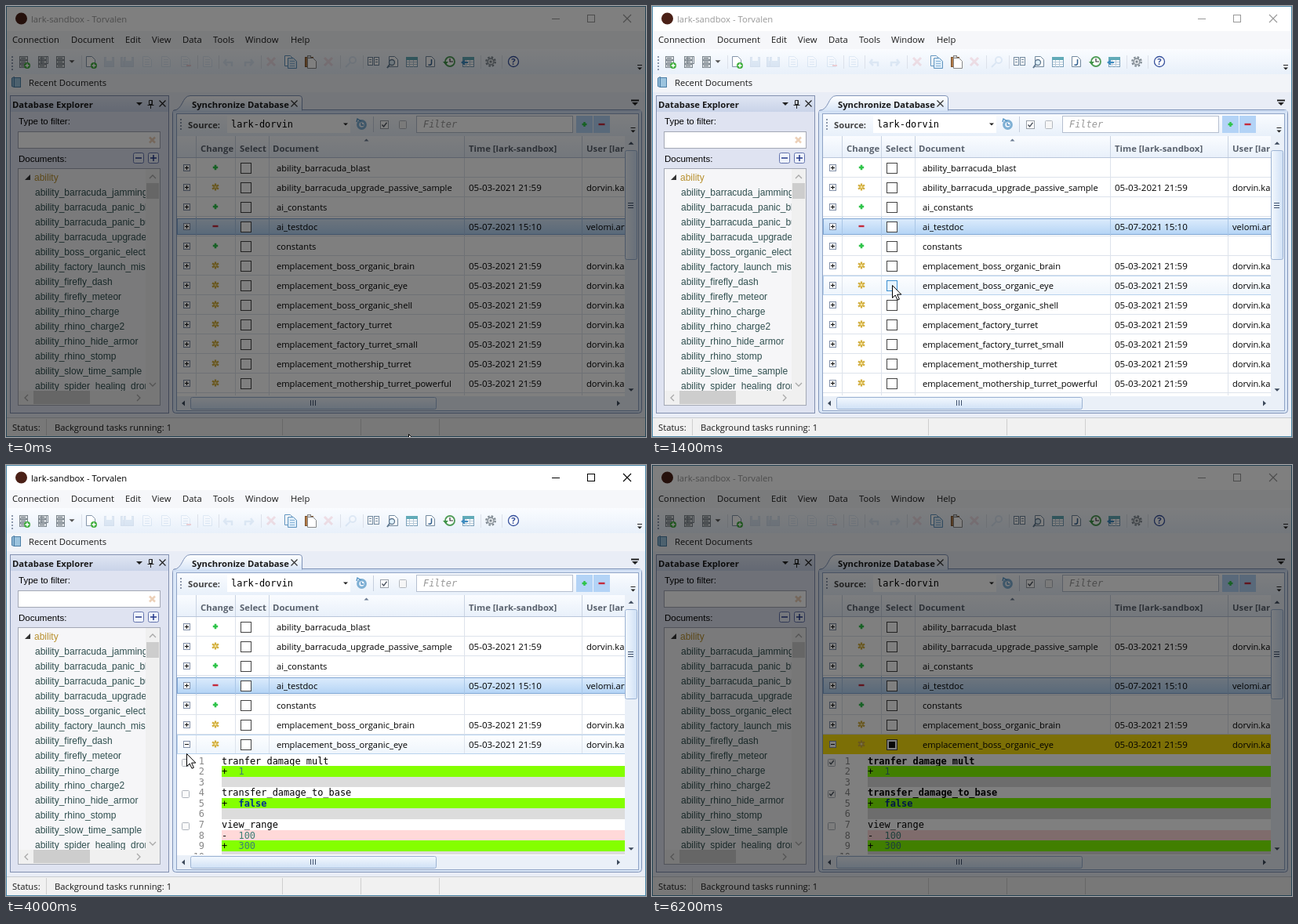
An HTML page that plays this animation: 816 by 550 pixels, repeating every 6400 ms.

```html
<!DOCTYPE html>
<html lang="en">
<head>
<meta charset="utf-8">
<title>Synchronize Database</title>
<style>
html, body { margin: 0; width: 100%; height: 100%; overflow: hidden; background: #fff; }
svg { display: block; }
text { font: 11.25px "Open Sans", "Noto Sans", sans-serif; fill: #1a1a1a; white-space: pre; }
.row { font-size: 11.15px; fill: #000; }
.num { font-size: 11.55px; fill: #000; }
.bold { font-weight: 700; }
.head { font-weight: 700; font-size: 11.35px; fill: #5a626e; }
.tree { font: 12px "Liberation Sans", Arial, sans-serif; fill: #2f4f4f; }
.label { font: 11.5px "Liberation Sans", Arial, sans-serif; fill: #000; }
.mono { font: 11.95px "DejaVu Sans Mono", monospace; fill: #000; }
</style>
</head>
<body>
<svg width="816" height="550" viewBox="0 0 816 550">
  <defs>
    <linearGradient id="bar" x2="0" y2="1"><stop stop-color="#fafcff"/><stop offset="1" stop-color="#e8f0fa"/></linearGradient>
    <linearGradient id="caption" x2="0" y2="1"><stop stop-color="#dfe5f3"/><stop offset="1" stop-color="#c9d3e8"/></linearGradient>
    <linearGradient id="tab" x2="0" y2="1"><stop stop-color="#fff"/><stop offset="1" stop-color="#d9e6f7"/></linearGradient>
    <linearGradient id="pick" x2="0" y2="1"><stop stop-color="#dcebfc"/><stop offset="1" stop-color="#b4d4f5"/></linearGradient>
    <linearGradient id="over" x2="0" y2="1"><stop stop-color="#fdfeff"/><stop offset="1" stop-color="#eef5fc"/></linearGradient>
    <linearGradient id="thumb" x2="0" y2="1"><stop stop-color="#f3f8fe"/><stop offset="1" stop-color="#cfe0f5"/></linearGradient>
    <linearGradient id="thumbV"><stop stop-color="#f3f8fe"/><stop offset="1" stop-color="#cfe0f5"/></linearGradient>
    <clipPath id="treeClip"><rect x="16" y="208" width="162" height="283"/></clipPath>
    <clipPath id="gridClip"><rect x="218" y="166" width="571" height="331"/></clipPath>
  </defs>
  <g id="base"></g>
  <g id="live"></g>
</svg>
<script>
const LOOP = 6400, STEP = 200;
const SPACE = 'lark-sandbox', USER = 'dorvin.ka', OTHER = 'velomi.arten';

const rect = (x, y, w, h, fill, stroke, more = '') => stroke
  ? `<rect x="${x + .5}" y="${y + .5}" width="${w - 1}" height="${h - 1}" fill="${fill}" stroke="${stroke}" ${more}/>`
  : `<rect x="${x}" y="${y}" width="${w}" height="${h}" fill="${fill}" ${more}/>`;
const path = (d, stroke, width = 1, fill = 'none') =>
  `<path d="${d}" fill="${fill}" stroke="${stroke}" stroke-width="${width}"/>`;
const shape = (d, fill) => `<path d="${d}" fill="${fill}"/>`;
// y is the middle of the line
const text = (x, y, s, cls = '', more = '') => `<text x="${x}" y="${y + 4}" class="${cls}" ${more}>${s}</text>`;
const cross = (x, y, r, color, width = 1) =>
  path(`M${x - r} ${y - r}l${2 * r} ${2 * r}m0 ${-2 * r}l${-2 * r} ${2 * r}`, color, width);
const plus = (x, y, r, color, width) => path(`M${x - r} ${y}h${2 * r}M${x} ${y - r}v${2 * r}`, color, width);
const minus = (x, y, r, color, width) => path(`M${x - r} ${y}h${2 * r}`, color, width);
const caret = (x, y, r = 4, color = '#222') => shape(`M${x - r} ${y - r / 2}h${2 * r}l${-r} ${r}z`, color);
const caretUp = (x, y, r, color) => shape(`M${x - r} ${y + r / 2}h${2 * r}l${-r} ${-r}z`, color);
const tick = (x, y, r, color, width) => path(`M${x - r} ${y}l${r * .7} ${r * .8}l${r * 1.3} ${-r * 1.7}`, color, width);
const circle = (x, y, r, fill, stroke = 'none', width = 1) =>
  `<circle cx="${x}" cy="${y}" r="${r}" fill="${fill}" stroke="${stroke}" stroke-width="${width}"/>`;
const overflow = (x, y) => path(`M${x - 3} ${y - 3.5}h6`, '#222') + caret(x, y + 1, 3);

// ---- toolbar icons, drawn around their middle ----
const page = (x, y, line = '#8495aa', fill = '#fff') => path(`M${x - 5.5} ${y - 6.5}h7l4 4v9h-11z`, line, 1, fill);
const lines = (x, y, color) => path(`M${x - 3} ${y - 2.5}h6m-6 3h6m-6 3h6`, color);
const server = (x, y) => [-7, -2, 3].map(dy => rect(x - 6, y + dy, 11, 5, '#dfe3e6', '#7c868e')
  + minus(x - 1, y + dy + 2.5, 3, '#59646d', 1)).join('');
const table = (x, y) => rect(x - 7, y - 7, 15, 13, '#fff', '#7ba0ba') + rect(x - 7, y - 7, 15, 4, '#62abb8')
  + path(`M${x - 6} ${y - .5}h13m-13 3h13M${x - 2.5} ${y - 3}v9m5 -9v9`, '#b5c9d9');
const badge = (x, y) => circle(x, y, 4, '#3fae3c') + plus(x, y, 2.5, '#fff', 1.5);
const faded = s => `<g opacity=".18">${s}</g>`;

function toolbar() {
  const y = 71, blue = '#7fa6cf', gray = '#71889e';
  let s = '';
  for (let i = 0; i < 5; i++) s += rect(7, 64 + i * 4, 2, 2, '#8d99ad');
  s += server(23, y) + badge(27, 76) + server(47, y) + rect(45, 64, 9, 10, 'none', '#7c868e') + server(70, y) + caret(84, 71, 3.5, '#555');
  s += page(108, y) + badge(112, 76);
  const save = x => rect(x - 7, y - 6, 13, 13, blue, '#6485b0') + rect(x - 4, y - 6, 7, 5, '#fff');
  const sheet = x => page(x, y, blue) + lines(x, y, blue);
  s += faded(save(132) + save(153) + save(157) + sheet(180) + sheet(204) + sheet(229) + minus(233, 76, 3, '#d22', 2)
    + sheet(257) + path('M281 68l-3 4l4 4M279 72h9v5', blue, 2.5) + path('M312 68l3 4l-4 4M314 72h-9v5', blue, 2.5)
    + cross(338, y, 5, '#d96b78', 3) + cross(411, y, 5, '#d96b78', 3) + circle(442, 69, 4, '#fff', blue, 2) + path('M439 72l-6 6', blue, 2));
  s += page(361, 70, '#5f93bf') + page(365, 73, '#5f93bf', '#dcecf8') + lines(365, 73, '#8bb5d9');
  s += rect(381, 65, 11, 13, '#b07a48', '#7d5530') + rect(384, 63, 5, 4, '#d9d9d9', '#888') + page(390, 73, '#888');
  s += rect(461, 65, 7, 11, '#fff', gray) + rect(469, 65, 7, 11, '#fff', gray) + path('M463 68.500h3m-3 3h3m5 -3h3m-3 3h3', gray);
  s += page(494, y, gray) + circle(492, 72, 3.5, '#dff0fa', '#5f7890', 1.3) + path('M489 75l-3 4', '#5f7890', 2);
  s += table(517, 72) + page(541, y, gray) + path('M542.500 68v5q0 3 -4 2', '#315f8e', 1.5);
  s += circle(566, y, 6, '#fff', '#4f9c57', 1.8) + path('M566 67v4h4', '#333', 1.2) + shape('M557 71h7l-3.500 4z', '#3d9146');
  s += table(589, 72) + shape('M580 72l5 -4v3h4v2h-4v3z', '#3e8cc0');
  s += circle(618, y, 5.8, 'none', '#7c868e', 2).replace('/>', ' stroke-dasharray="2.5 2.05"/>')
    + circle(618, y, 4, '#dfe3e7', '#7c868e', 1.3) + circle(618, y, 1.5, '#7c868e');
  s += circle(647, y, 6.5, '#fff', '#344f9c', 1.3) + text(644.3, 71, '?', 'bold', 'style="fill:#344f9c"');
  for (const x of [96, 244, 271, 325, 426, 455, 605, 632]) s += rect(x, 63, 1, 17, '#dce1ea');
  return s + overflow(808, 79);
}

function explorer() {
  const items = ['barracuda_jamming_field', 'barracuda_panic_blast', 'barracuda_panic_burst', 'barracuda_upgrade_passive',
    'boss_organic_electric', 'factory_launch_missile', 'firefly_dash', 'firefly_meteor', 'rhino_charge', 'rhino_charge2',
    'rhino_hide_armor', 'rhino_stomp', 'slow_time_sample', 'spider_healing_drone'];
  let s = rect(5, 114, 203, 406, '#dfe3f1', '#8290b0') + rect(6, 115, 201, 20, 'url(#caption)');
  s += text(8, 126, 'Database Explorer', 'bold') + caret(170, 125, 4)
    + path('M182.500 120.500h4v5h-4zM186 120v6M180.500 126.500h8M184.500 126v5', '#222') + cross(199.5, 124.5, 4, '#222', 1.2);
  s += text(16, 147, 'Type to filter:', 'label') + rect(15, 160, 182, 22, '#fff', '#a3a8b5') + cross(186.5, 171, 3.5, '#ecd0b8', 2.5);
  s += text(16, 195, 'Documents:', 'label');
  for (const x of [162, 181]) s += rect(x, 187, 14, 14, '#eef2fb', '#6474ae', 'rx="2"');
  s += minus(169, 194, 4, '#24388a', 1.5) + plus(188, 194, 4, '#24388a', 1.5);
  s += rect(15, 207, 182, 303, '#f6f6f8', '#a3a8b5') + '<g clip-path="url(#treeClip)">';
  s += shape('M31 215v7h-7z', '#333') + text(36, 219, 'ability', 'tree', 'style="fill:#b8902e"');
  items.forEach((name, i) => s += text(37, 238 + 19 * i, 'ability_' + name, 'tree'));
  s += '</g>' + rect(178, 208, 18, 301, '#f0f0f0') + rect(16, 491, 162, 18, '#f0f0f0')
    + rect(179, 226, 16, 20, '#cdcdcd') + rect(35, 491, 72, 17, '#cdcdcd');
  return s + path('M183 220l4 -4l4 4M183 481l4 4l4 -4M28 496l-4 4l4 4M167 496l4 4l-4 4', '#a8a8a8', 1.3);
}

function syncPanel() {
  let s = rect(212, 132, 599, 388, '#dbe7f7', '#7f93b8', 'rx="4"') + rect(213, 133, 597, 3, '#cfdef3');
  s += path('M213 133.500C226 133 224 114.500 235 114.500H374Q377.500 114.500 377.500 118V133.500', '#7f93b8', 1, 'url(#tab)');
  s += text(237, 126, 'Synchronize Database', 'bold') + cross(367.5, 124.5, 4, '#333', 1.2)
    + path('M797 120.500h10', '#222', 2) + caret(802, 125, 4);
  s += rect(217, 137, 590, 380, '#fff', '#8ea3c6') + rect(218, 138, 588, 28, 'url(#bar)');
  for (let i = 0; i < 4; i++) s += rect(222, 144 + i * 4, 2, 2, '#8d99ad');
  s += text(232, 152, 'Source:', 'bold', 'style="fill:#444"') + rect(282, 140, 157, 22, '#fff')
    + text(287, 151, 'lark-dorvin', 'mono') + caret(433, 151, 3);
  s += circle(453.5, 151.5, 4.8, 'none', '#7fb0d4', 3.2) + path('M447 148l1 -4l5 3M453 149v3h3', '#4f90c2', 1.3) + rect(468, 141, 1, 20, '#c5cedd');
  s += rect(477, 146, 11, 11, '#fff', '#9aa0a8') + tick(482.5, 151.5, 3, '#4d5560', 1.4)
    + rect(501, 146, 10, 11, '#f6f6f6', '#b3b8bf', 'rx="1"');
  s += rect(523, 140, 200, 22, '#fff', '#b5bfd0') + text(532, 151, 'Filter', 'mono', 'style="fill:#999;font-style:italic"');
  s += rect(727, 140, 21, 22, '#b3d3f6') + rect(749, 140, 21, 22, '#b3d3f6') + plus(737.5, 151, 3, '#2fc44a', 2.4)
    + minus(759.5, 151, 4, '#c42b3c', 2.4) + overflow(799.5, 159);
  // bottom scroll bar
  s += rect(218, 498, 588, 18, '#eaf0f8') + rect(235, 499, 314, 16, 'url(#thumb)', '#9cb3d3', 'rx="2"')
    + path('M388.500 503v7m3 -7v7m3 -7v7', '#3d4f6b') + shape('M228 503.500v7l-4 -3.500zM779 503.500v7l4 -3.500z', '#3d4a5c');
  return s;
}

function drawBase() {
  const menu = [[8, 'Connection'], [83, 'Document'], [152, 'Edit'], [186, 'View'], [225, 'Data'], [264, 'Tools'], [305, 'Window'], [363, 'Help']];
  let s = rect(0, 0, 816, 550, '#e9edf6') + rect(0, 0, 816, 32, '#fff') + rect(0, 32, 816, 23, '#f6f7fa')
    + rect(0, 55, 816, 32, 'url(#bar)') + rect(0, 87, 816, 23, '#f2f4f8');
  s += circle(19.5, 16, 7.5, '#4b2117');
  for (const [x, name] of menu) s += text(x, 43, name);
  s += toolbar() + path('M7.500 92l3 -1.500v13l-3 -1z', '#4b7ea6', 1, '#8fb9d6') + rect(10, 91, 9, 13, '#9cc4de', '#4b7ea6') + text(29, 98, 'Recent Documents');
  s += explorer() + syncPanel();
  s += rect(0, 525, 816, 25, '#f1f1f1') + rect(0, 525, 816, 1, '#c9ccd2');
  for (const x of [51, 352, 452, 552]) s += rect(x, 527, 1, 21, '#cfcfcf');
  s += text(8, 538, 'Status:') + text(62, 538, 'Background tasks running: 1');
  return s + rect(0, 0, 816, 550, 'none', '#4b87a8');
}

// ---- grid ----
const ROWS = ['+ability_barracuda_blast', '*ability_barracuda_upgrade_passive_sample', '+ai_constants', '-ai_testdoc', '+constants',
  ...['boss_organic_brain', 'boss_organic_eye', 'boss_organic_shell', 'factory_turret', 'factory_turret_small',
    'mothership_turret', 'mothership_turret_powerful', 'organic_tower'].map(s => '*emplacement_' + s)];
const EYE = 6, COLS = [242, 292, 335, 584, 734];

const mark = {
  '+': y => plus(267, y, 3.2, '#2fc44a', 2.6),
  '-': y => minus(267, y, 3.5, '#c42b3c', 2.4),
  '*': y => path(`M267 ${y - 4.5}v9M263 ${y - 2.5}l8 5m0 -5l-8 5`, '#d2ae3e', 2.3) + circle(267, y, 1.5, '#f7e49c'),
};

function checkBox(y, kind, hot) {
  let s = rect(299, y - 6.5, 14, 14, hot ? '#e6f3fd' : '#fff', hot ? '#3c8fd0' : '#444');
  if (kind === 'on') s += tick(306, y, 4.5, '#111', 2.4);
  if (kind === 'part') s += rect(302, y - 3.5, 8, 8, '#111');
  return s;
}

function row(i, st) {
  const y = 206.5 + 25 * i, top = y - 12.5, hot = st.hover === i, eye = i === EYE;
  const kind = eye ? st.check : '', filled = kind && !hot, open = eye && st.open;
  const name = ROWS[i], type = name[0];
  let s = rect(218, top, 571, 25, filled ? '#fadf0c' : hot && !kind ? 'url(#over)' : '#fff');
  if (type === '-') s += rect(218, top + 2, 573, 21, 'url(#pick)', '#7ea5d3');
  if (!filled) {
    for (const x of COLS) s += rect(x, top, 1, 25, type === '-' ? '#a9c6e6' : '#dde3ec');
    s += rect(218, top + 24, 571, 1, '#dde3ec');
  }
  if (hot && !kind) s += rect(218, top, 573, 25, 'none', '#b9d3ee');
  if (hot && kind) s += rect(219, top + 1, 572, 23, 'none', '#d9cf45', 'stroke-width="2"');
  s += rect(226, y - 4.5, 9, 9, '#fff', '#8290a8') + (open ? minus : plus)(230.5, y, 2.5, '#111', 1);
  s += mark[type](y - .5) + checkBox(y, kind, hot && st.x > 294 && st.x < 335) + text(345, y + .5, name.slice(1), 'row');
  if (type !== '+') s += text(590, y + .5, type === '-' ? '05-07-2021 15:10' : '05-03-2021 21:59', 'num')
    + text(740, y + .5, type === '-' ? OTHER : USER, 'row');
  return s;
}

function details(st) {
  const tint = { '+': '#84ff00', '-': '#ffd9d9', ' ': '#dcdcdc' };
  const body = ['tranfer_damage_mult', '+  1', ' ', 'transfer_damage_to_base', '+  false', ' ', 'view_range', '-  100', '+  300', ' '];
  const lineY = i => Math.round(377.7 + 13.55 * i);
  let s = rect(218, 369, 571, 130, '#fff');
  body.forEach((line, i) => {
    const y = lineY(i), color = tint[line[0]];
    s += text(253, y, i + 1, 'mono', 'text-anchor="end" style="fill:#888"');
    if (color) {
      const word = line.slice(3), isWord = word === 'false';
      s += rect(275, y - 7, 514, lineY(i + 1) - y, color) + text(275, y, line[0], 'mono')
        + text(296.5, y, word, 'mono', `style="fill:${isWord ? '#00308f;font-weight:700' : '#3c7f78'}"`);
      return;
    }
    const on = i / 3 < st.picked;
    s += text(275, y, line, 'mono', on ? 'style="font-weight:700"' : '');
    s += rect(224, y - 3, 10, 10, '#fafafa', '#adb3bb', 'rx="1"') + (on ? tick(229, y + 1.5, 2.8, '#4d5560', 1.4) : '');
  });
  return s;
}

function grid(st) {
  let s = '<g clip-path="url(#gridClip)">' + rect(218, 166, 571, 28, 'url(#bar)');
  const last = st.open ? EYE : ROWS.length - 1;
  for (let i = 0; i <= last; i++) s += row(i, st);
  if (st.open) s += details(st);
  for (const x of COLS) s += rect(x, 166, 1, 28, '#c9d3e2');
  s += rect(218, 193, 571, 1, '#b9c6da') + caretUp(459.5, 171, 3, '#6a7a92');
  [[248, 'Change'], [298, 'Select'], [340, 'Document'], [590, `Time [${SPACE}]`], [740, `User [${SPACE}]`]]
    .forEach(([x, name]) => s += text(x, 182, name, 'head'));
  s += '</g>';
  const h = st.open ? 115 : 140, mid = 184 + h / 2;
  s += rect(789, 166, 17, 332, '#eaf0f8') + caretUp(797, 175, 3.5, '#3d4a5c') + caret(797, 490, 3.5, '#3d4a5c')
    + rect(789, 184, 16, h, 'url(#thumbV)', '#9cb3d3', 'rx="2"');
  return s + path(`M793 ${Math.floor(mid) - 2.5}h7m-7 3h7m-7 3h7`, '#3d4f6b');
}

// ---- time ----
const TRACK = [[0, 513, 546], [400, 400, 450], [800, 321, 375], [1200, 306, 356], [2600, 306, 356], [3200, 230, 357],
  [3800, 230, 357], [4200, 229, 378], [4600, 229, 378], [5000, 227, 417], [5400, 227, 417], [5800, 260, 560]];

function pointer(t) {
  const k = TRACK.findIndex(p => p[0] > t);
  if (k < 0) return [260, 560];
  const [t0, x0, y0] = TRACK[k - 1], [t1, x1, y1] = TRACK[k], u = (t - t0) / (t1 - t0);
  return [x0 + (x1 - x0) * u, y0 + (y1 - y0) * u].map(Math.round);
}

function stateAt(t) {
  const [x, y] = pointer(t), open = t >= 3600;
  const picked = t >= 5200 ? 2 : t >= 4400 ? 1 : 0;
  let hover = x > 218 && x < 789 && y > 194 && y < 497 ? Math.floor((y - 194) / 25) : -1;
  if (open && hover > EYE) hover = EYE;
  return { x, y, open, picked, hover, check: picked ? 'part' : t >= 1600 && t < 2600 ? 'on' : '',
    active: t >= 1600 && t < 5800, dim: t < 200 || t >= 6200 };
}

function drawLive(t) {
  const st = stateAt(t), ink = st.active ? '#000' : '#999';
  let s = text(32, 17, SPACE + ' - Torvalen', '', `style="fill:${ink}"`);
  s += path('M696 16.500h10', ink) + rect(741, 11, 10, 10, 'none', ink) + cross(792, 16, 5, ink, 1.1);
  s += grid(st);
  if (st.dim) s += rect(0, 0, 816, 550, '#000', '', 'opacity=".5"');
  const arrow = 'v16l3.700 -3.500l2.800 6.200l2.400 -1l-2.800 -6.100h5.200z';
  return s + path(`M${st.x + .5} ${st.y + .5}` + arrow, '#000', 1, '#fff');
}

const live = document.getElementById('live');
document.getElementById('base').innerHTML = drawBase();
let shown = -1;
const start = performance.now();
function tickFrame(now) {
  const t = Math.floor(Math.max(0, now - start) % LOOP / STEP) * STEP;
  if (t !== shown) live.innerHTML = drawLive(shown = t);
  requestAnimationFrame(tickFrame);
}
tickFrame(start);
</script>
</body>
</html>
```
